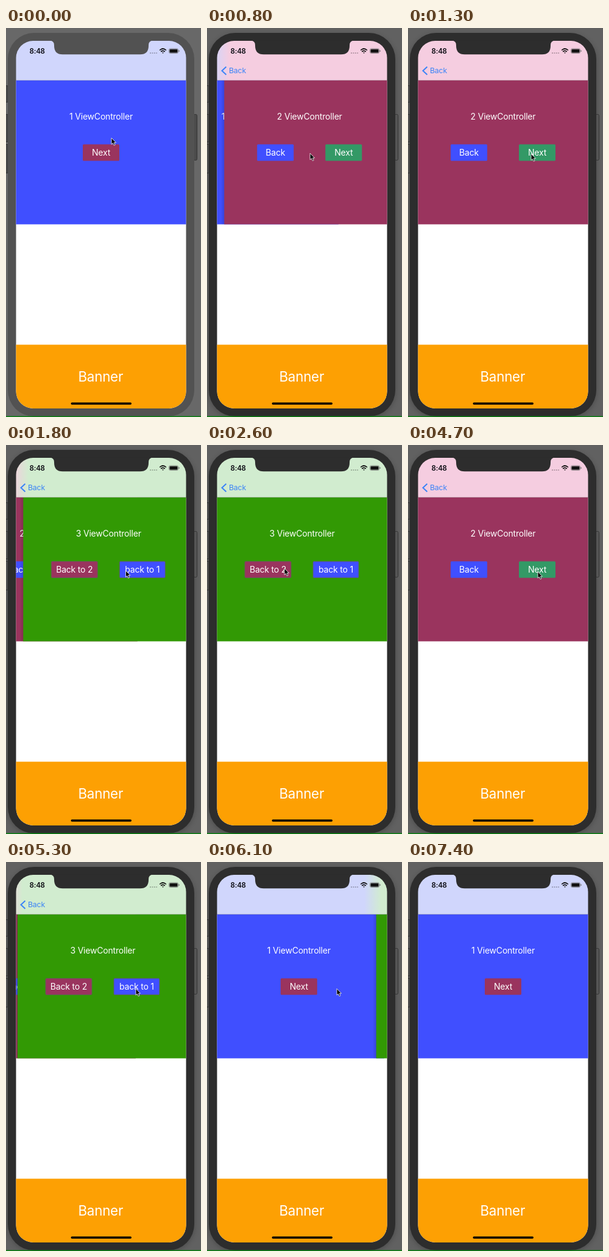
Recreate the animation shown at these times as an HTML page. Size 320 by 637 pixels, loop 7500 ms.

```html
<!DOCTYPE html>
<html lang="en">
<head>
<meta charset="utf-8">
<title>Navigation with a fixed banner</title>
<style>
  html, body { margin: 0; width: 100%; height: 100%; overflow: hidden; background: #616161; }
  svg { display: block; width: 100%; height: 100%; }
  text { font: 14px Inter, "Liberation Sans", sans-serif; letter-spacing: -.2px; fill: #fff; }
  .mid { text-anchor: middle; }
</style>
</head>
<body>
<svg viewBox="0 0 320 637">
  <defs>
    <clipPath id="screen"><rect x="16.500" y="21" width="279" height="602" rx="28"/></clipPath>
    <clipPath id="content"><rect x="16" y="85.700" width="280" height="235.900"/></clipPath>
    <linearGradient id="tint" gradientUnits="userSpaceOnUse" y1="0" y2="0">
      <stop id="tintL"/><stop id="tintR" offset="1"/>
    </linearGradient>
    <linearGradient id="edge">
      <stop stop-opacity="0"/><stop offset="1" stop-opacity=".15"/>
    </linearGradient>
    <filter id="soft"><feGaussianBlur stdDeviation="5"/></filter>
  </defs>

  <rect id="desk" width="320" height="637"/>
  <rect id="halo" x="3" y="11" width="306" height="627" rx="44" opacity=".25" filter="url(#soft)"/>
  <g id="keys" stroke="#353535">
    <rect x="-4" y="94.500" width="7" height="27"/>
    <rect x="-4" y="141.500" width="7" height="45"/>
    <rect x="-4" y="190.500" width="7" height="47"/>
    <rect x="308" y="141.500" width="5.500" height="75" rx="2"/>
  </g>
  <rect id="bezel" x="3" y="8" width="306" height="628" rx="43"/>
  <rect y="635.500" width="320" height="1.500" fill="#087d10"/>

  <g clip-path="url(#screen)">
    <rect x="16" y="86" width="280" height="537" fill="#fff"/>
    <g id="pages" clip-path="url(#content)"></g>
    <rect x="16" y="20" width="280" height="65.700" fill="url(#tint)"/>
    <g id="back">
      <path d="M31.500 63.500L24.500 70L31.500 76.500" fill="none" stroke="#3b84f7" stroke-width="2"/>
      <text x="36" y="74.300" style="font-size:12.300px;fill:#3b84f7">Back</text>
    </g>
    <rect x="16" y="518.600" width="280" height="105" fill="#fda003"/>
    <text class="mid" x="155.300" y="578.800" style="font-size:22.300px">Banner</text>
    <rect x="106.500" y="613.200" width="99.500" height="3.500" rx="1.700"/>
  </g>

  <path id="notch" d="M72 20.500Q79 21 79 28V29Q79 43.300 93 43.300H220Q234 43.300 234 29V28Q234 21 241 20.500Z"/>
  <text x="38.500" y="42" style="font-size:11.500px;font-weight:600;fill:#0b0b12">8:48</text>
  <path d="M236 41H248" stroke="#000" stroke-opacity=".25" stroke-width="1.800" stroke-dasharray="2 1.400"/>
  <g fill="none" stroke="#111" stroke-width="1.700">
    <path d="M252.200 36.500Q257.500 31.500 262.800 36.500M254.200 38.800Q257.500 35.800 260.800 38.800"/>
    <path d="M256 40L257.500 41.800L259 40Z" fill="#111" stroke="none"/>
  </g>
  <rect x="267.500" y="33.800" width="15" height="7.600" rx="2" fill="none" stroke="#777" stroke-width=".8"/>
  <rect x="268.500" y="34.800" width="13" height="5.600" rx="1.200" fill="#111"/>
  <path d="M284 36.200V39" stroke="#777" stroke-width="1.200"/>

  <path id="cursor" d="M0 0V10.500L2.400 8.400L4.100 12.200L6 11.400L4.300 7.700H7.500Z" fill="#000" stroke="#fff" stroke-width=".8"/>
</svg>

<script>
const $ = id => document.getElementById(id);
const BLUE = '#404fff', MAROON = '#9a345e', GREEN = '#329904';
const LOOP = 7500, STEP = 100, WIDTH = 279, PARALLAX = 84, LEFT = 16.5;

// buttons: label, x, width, colour
const pages = [
  { color: BLUE, bar: '#d0d6fc', border: 'none', buttons: [['Next', 126, 60, MAROON]] },
  { color: MAROON, bar: '#f5cde0', border: 'none', buttons: [['Back', 70, 60, BLUE], ['Next', 182, 60, '#339966']] },
  { color: GREEN, bar: '#d1eccf', border: '#5b6650', buttons: [['Back to 2', 62, 76, MAROON], ['back to 1', 174, 75, BLUE]] }
];

// start time, page left, page entered
const moves = [[450, 0, 1], [1450, 1, 2], [2700, 2, 1], [4830, 1, 2], [5780, 2, 0]];

// time, x, y of the pointer tip
const trail = [
  [0, 173, 180], [300, 163, 205], [700, 163, 205], [1100, 202, 206], [1700, 202, 206],
  [2300, 127, 202], [2700, 127, 202], [3100, 124, 202], [3400, 124, 202],
  [4200, 213, 207.5], [6600, 213, 207.5], [7200, 250, 640]
];

$('pages').innerHTML = pages.map((p, i) => `<g>
  <rect x="10" y="85" width="6.5" height="237" fill="url(#edge)"/>
  <rect x="16" y="85" width="280" height="237" fill="${p.color}"/>
  <text class="mid" x="156" y="150">${i + 1} ViewController</text>
  ${p.buttons.map(([label, x, w, color]) => `
    <rect x="${x}" y="190.600" width="${w}" height="26.800" rx="1.500" fill="${color}" stroke="${p.border}"/>
    <text class="mid" x="${x + w / 2}" y="209">${label}</text>`).join('')}
</g>`).join('');
const views = [...$('pages').children];

const spring = s => 1 - (1 + 14 * s) * Math.exp(-14 * s);
const smooth = u => u * u * (3 - 2 * u);
const place = (el, x, y = 0) => el.setAttribute('transform', `translate(${x} ${y})`);
const fill = (id, color) => $(id).setAttribute('fill', color);

function drawPages(t) {
  const [start, from, to] = moves.findLast(m => m[0] <= t) || [-LOOP, 0, 0];
  let p = spring((t - start) / 1000);
  if (p > .995) p = 1;
  const moving = p < 1;
  const low = moving ? Math.min(from, to) : to;
  const high = moving ? Math.max(from, to) : to;
  const shown = to >= from ? p : 1 - p;
  const x = moving ? WIDTH * (1 - shown) : 0;
  views.forEach((v, i) => v.style.display = i === low || i === high ? '' : 'none');
  place(views[low], -PARALLAX * shown);
  place(views[high], x);

  $('tint').setAttribute('x1', LEFT + x - 20);
  $('tint').setAttribute('x2', LEFT + x + 8);
  $('tintL').setAttribute('stop-color', pages[low].bar);
  $('tintR').setAttribute('stop-color', pages[high].bar);
  const fade = Math.min(1, p * 1.1);
  $('back').setAttribute('opacity', (from > 0) * (1 - fade) + (to > 0) * fade);
}

function drawCursor(t) {
  const i = trail.findIndex(k => k[0] > t);
  $('cursor').style.display = i < 0 ? 'none' : '';
  if (i < 0) return;
  const [a, b] = [trail[i - 1], trail[i]];
  const u = smooth((t - a[0]) / (b[0] - a[0]));
  place($('cursor'), a[1] + (b[1] - a[1]) * u, a[2] + (b[2] - a[2]) * u);
}

// The window darkens once the first click gives it focus.
function drawWindow(active) {
  fill('desk', active ? '#616161' : '#686868');
  fill('bezel', active ? '#2d2d2d' : '#525252');
  fill('notch', active ? '#2d2d2d' : '#525252');
  fill('keys', active ? '#555' : '#4b4b4b');
  $('halo').style.display = active ? '' : 'none';
}

function frame(now) {
  const t = Math.floor(now % LOOP / STEP) * STEP;
  drawPages(t);
  drawCursor(t);
  drawWindow(t >= 400);
  requestAnimationFrame(frame);
}
frame(0);
</script>
</body>
</html>
```
